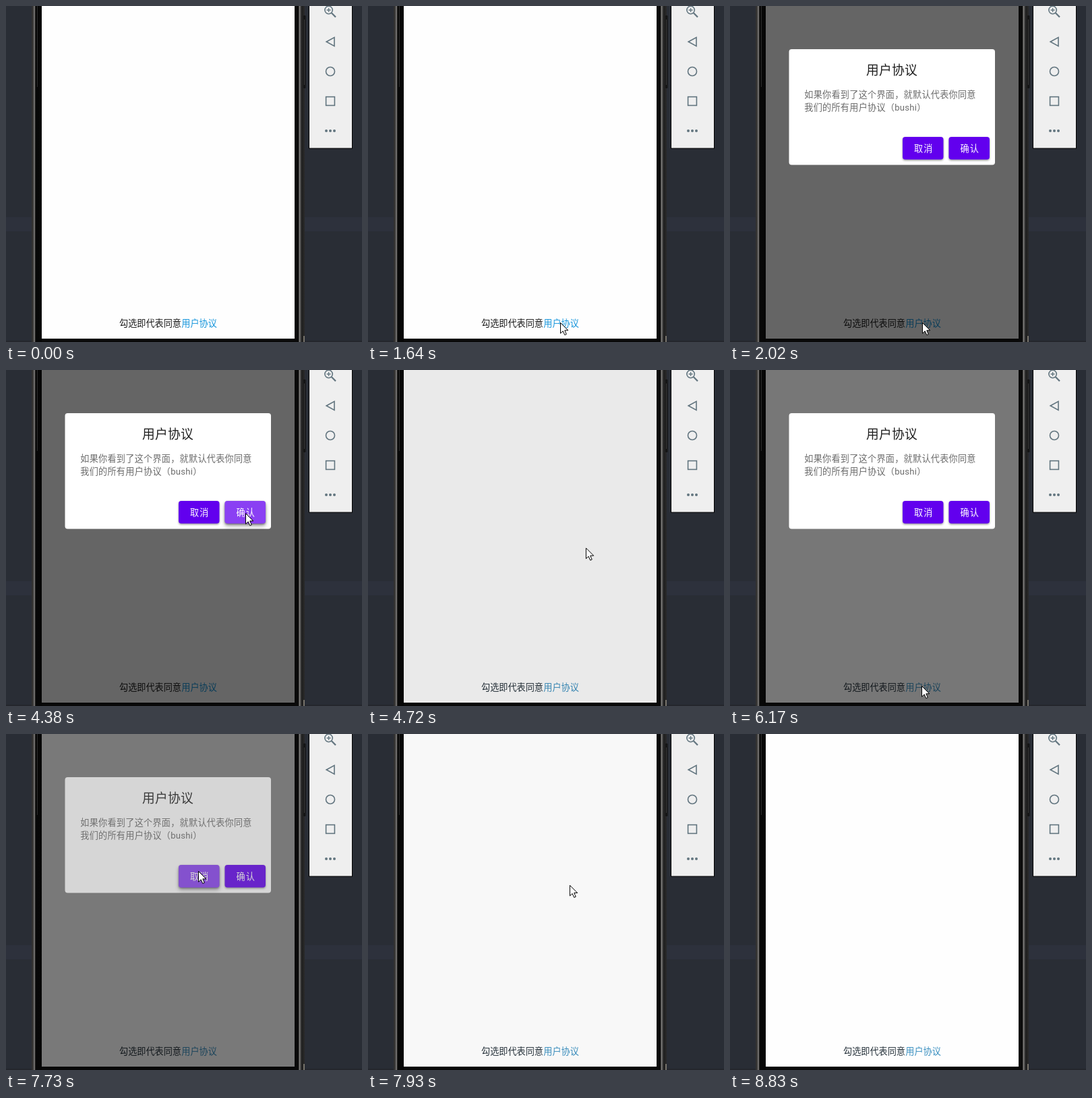
Animation, 528 px wide and 498 px high, one loop 9570 ms. Source, as an HTML page:

```html
<!DOCTYPE html>
<html lang="zh-CN">
<head>
<meta charset="utf-8">
<style>
html, body { margin: 0; width: 100%; height: 100%; overflow: hidden; background: #292d35; }
svg { display: block; width: 528px; height: 498px; }
text { font-family: Roboto, "Noto Sans CJK SC", "Noto Sans CJK", sans-serif; }
.note { font-size: 13.15px; }
.body { font-size: 13.15px; letter-spacing: .25px; fill: #6c6c6c; }
.title { font-size: 18.8px; letter-spacing: .25px; fill: #202020; }
.label { font-size: 13.15px; font-weight: 500; letter-spacing: 1.1px; fill: #fff; }
.btn { fill: #6200ee; }
.icon { fill: none; stroke: #62757f; stroke-width: 1.6; }
</style>
</head>
<body>
<svg viewBox="0 0 528 498">
  <defs>
    <linearGradient id="edge">
      <stop offset="0" stop-color="#1c1c1c"/>
      <stop offset=".08" stop-color="#4e4c4a"/>
      <stop offset=".15" stop-color="#161616"/>
      <stop offset=".24" stop-color="#8c8a88"/>
      <stop offset=".34" stop-color="#3a3938"/>
      <stop offset=".42" stop-color="#080808"/>
      <stop offset="1" stop-color="#060606"/>
    </linearGradient>
    <linearGradient id="rim">
      <stop offset="0" stop-color="#0a0a0a"/>
      <stop offset=".38" stop-color="#0a0a0a"/>
      <stop offset=".48" stop-color="#858381"/>
      <stop offset=".6" stop-color="#444"/>
      <stop offset=".72" stop-color="#1e1e1e"/>
      <stop offset="1" stop-color="#2b2b2b"/>
    </linearGradient>
    <filter id="soft" x="-20%" y="-30%" width="140%" height="170%"><feGaussianBlur stdDeviation="1.6"/></filter>
    <filter id="wide" x="-20%" y="-40%" width="140%" height="190%"><feGaussianBlur stdDeviation="3"/></filter>
  </defs>

  <rect width="528" height="498" fill="#292d35"/>
  <rect y="313" width="528" height="21" fill="#2d313c"/>
  <rect y="496" width="528" height="2" fill="#24272d"/>

  <rect x="38" width="405" height="498" fill="#080808"/>
  <rect x="38" width="15" height="498" fill="url(#edge)"/>
  <rect x="428" width="15" height="498" fill="url(#rim)"/>
  <rect x="46" width="1" height="120" fill="#2c2c2c"/>
  <rect x="441" y="14" width="3.5" height="108" rx="1" fill="#151515"/>
  <rect x="442" y="20" width="1" height="97" fill="#3c3c3c"/>
  <rect x="441" y="489" width="2" height="9" fill="#77736b"/>

  <rect x="53" width="375" height="493" fill="#fefefe"/>
  <text class="note" id="note" x="168" y="474.5">勾选即代表同意</text>
  <text class="note" id="link" x="260.3" y="474.5" font-weight="500">用户协议</text>
  <rect id="dim" x="53" width="375" height="493" opacity="0"/>

  <g id="dialog" opacity="0">
    <rect x="87.5" y="64" width="305.5" height="171.5" rx="4" fill="#fff"/>
    <text class="title" x="202" y="101.5">用户协议</text>
    <text class="body" x="110.3" y="136">如果你看到了这个界面，就默认代表你同意</text>
    <text class="body" x="110.3" y="155">我们的所有用户协议（bushi）</text>
    <g id="cancel"></g>
    <g id="ok"></g>
  </g>

  <rect x="449.5" y="-2" width="64" height="213" fill="#efefef" stroke="#000"/>
  <g class="icon">
    <circle cx="478.6" cy="6" r="5.7"/>
    <path d="M482.8 10.2L489 16.6" stroke-width="2.2"/>
    <path d="M475.6 6h6M478.6 3v6" stroke-width="1.3"/>
    <path d="M475.2 53L487 46.6V59.4Z"/>
    <circle cx="481" cy="97" r="6.5"/>
    <rect x="474.6" y="134.6" width="12.8" height="12.8"/>
  </g>
  <g fill="#62757f">
    <circle cx="475" cy="185" r="2"/><circle cx="481" cy="185" r="2"/><circle cx="487" cy="185" r="2"/>
  </g>

  <path id="cursor" d="M.5 .5V16.2L4.2 12.8L6.8 18.6L9.3 17.5L6.8 11.8H11.8Z" fill="#fff" stroke="#000" stroke-linejoin="round"/>
</svg>
<script>
const LOOP = 9570;
const $ = id => document.getElementById(id);
const clamp = v => Math.min(1, Math.max(0, v));
const ramp = (t, start, length) => clamp((t - start) / length);
const easeOut = p => 1 - (1 - p) ** 2;
const smooth = p => p * p * (3 - 2 * p);

// time, x, y of the pointer tip
const PATH = [
  [330, 240, 499], [800, 264, 470], [1050, 281, 454], [1250, 274, 457], [1340, 274, 457],
  [1470, 285, 469], [2420, 285, 469], [2840, 288, 420], [3000, 288, 420], [3450, 318, 305],
  [3960, 355, 212], [4420, 355, 212], [4720, 323, 263], [5080, 285, 410], [5320, 273, 456],
  [5500, 273, 456], [5900, 284, 468], [6240, 284, 468], [6640, 292, 345], [6990, 286, 225],
  [7080, 286, 225], [7250, 285, 203], [7840, 285, 203], [8200, 340, 285], [8820, 494, 500]
];

// opening start, closing start, button, hover start, press start
const VISITS = [
  { open: 1785, close: 4512, button: 'ok', hover: 3820, press: 4050 },
  { open: 6040, close: 7700, button: 'cancel', hover: 6980, press: 7400 }
];

function button(id, x, label) {
  const box = (cls, extra) => `<rect class="${cls}" x="${x}" y="194" width="60.5" height="33.5" rx="4" ${extra}/>`;
  $(id).innerHTML =
    box('', 'transform="translate(0 1.5)" opacity=".4" filter="url(#soft)"') +
    box('lift', 'transform="translate(0 4)" opacity="0" filter="url(#wide)"') +
    box('btn', '') +
    box('glow', 'fill="#fff" opacity="0"') +
    `<text class="label" x="${x + 17}" y="216">${label}</text>`;
}
button('cancel', 256, '取消');
button('ok', 324.5, '确认');

function pointer(t) {
  const next = PATH.findIndex(k => k[0] > t);
  if (next < 1) return null;
  const [t0, x0, y0] = PATH[next - 1];
  const [t1, x1, y1] = PATH[next];
  const p = (t - t0) / (t1 - t0);
  return [x0 + (x1 - x0) * p, y0 + (y1 - y0) * p];
}

function draw(t) {
  const visit = VISITS[t < 5500 ? 0 : 1];
  const closed = ramp(t, visit.close, 240);
  const dim = .6 * easeOut(ramp(t, visit.open, 200)) * (1 - closed);
  const shown = easeOut(ramp(t, visit.open, 125));
  $('dim').setAttribute('opacity', dim);
  $('dialog').setAttribute('opacity', shown * (1 - ramp(t, visit.close, 103)));
  const scale = .9 + .1 * shown;
  $('dialog').setAttribute('transform', `translate(240 150) scale(${scale}) translate(-240 -150)`);

  for (const id of ['cancel', 'ok']) {
    const active = id === visit.button;
    const hover = active ? ramp(t, visit.hover, 100) : 0;
    const press = active ? smooth(ramp(t, visit.press, 180)) : 0;
    $(id).querySelector('.glow').setAttribute('opacity', .08 * hover + .17 * press);
    $(id).querySelector('.lift').setAttribute('opacity', .1 * hover + .2 * press);
  }

  const faded = t > 4500;
  $('note').setAttribute('fill', faded ? '#26323b' : '#1b1b1b');
  $('link').setAttribute('fill', faded ? '#3b90c0' : '#1796dc');

  const at = pointer(t);
  $('cursor').setAttribute('visibility', at ? 'visible' : 'hidden');
  if (at) $('cursor').setAttribute('transform', `translate(${at[0]} ${at[1]})`);
}

const begin = performance.now();
function tick() {
  draw((performance.now() - begin) % LOOP);
  requestAnimationFrame(tick);
}
tick();
</script>
</body>
</html>
```
